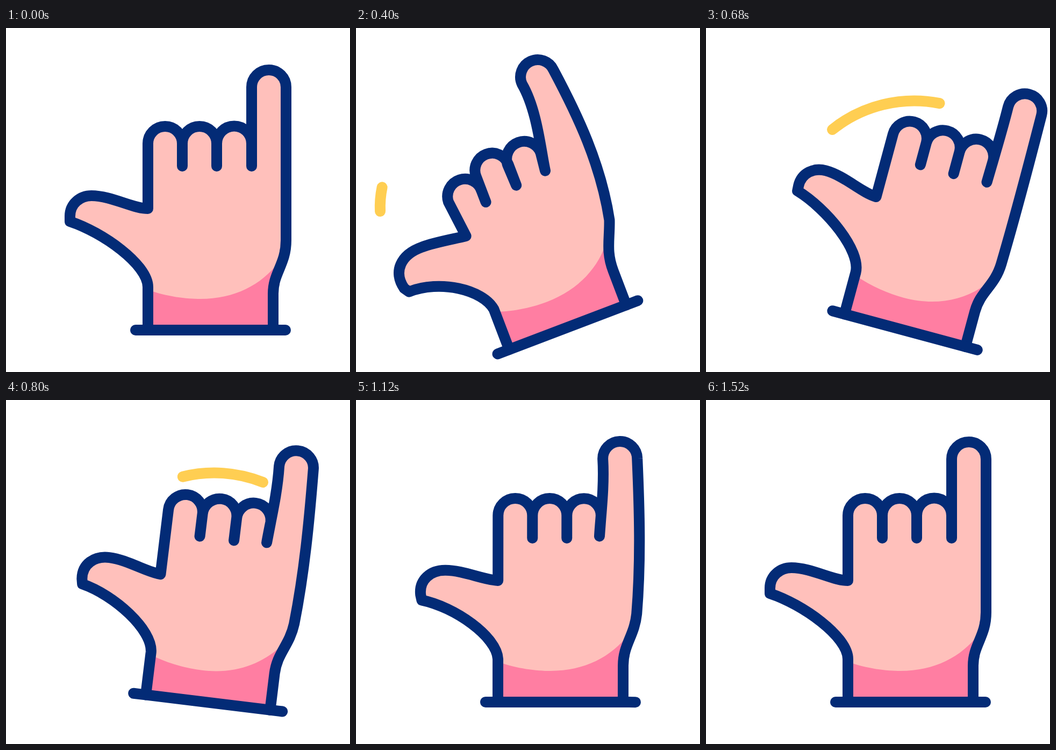
Write an HTML page that moves like this. It is 640 px wide and 640 px high and loops after 2000 ms.

```html
<!DOCTYPE html>
<html lang="en">
<head>
<meta charset="utf-8">
<title>Waving hand</title>
<style>
  html, body { margin: 0; width: 100%; height: 100%; overflow: hidden; background: #fff; }
  svg { display: block; width: 100%; height: 100%; }
  .line { fill: none; stroke: #032b76; stroke-width: 20; stroke-linecap: round; stroke-linejoin: round; }
  .streak { fill: none; stroke: #ffce52; stroke-width: 20; stroke-linecap: round; }
</style>
</head>
<body>
<svg viewBox="0 0 640 640">
  <path class="streak" id="left" pathLength="1" d="M352 87C225 78 38 190 45 341"/>
  <path class="streak" id="right" pathLength="1" d="M235 189A244 244 0 0 1 478 153"/>
  <g id="hand">
    <path id="skin" fill="#ffc0bb"/>
    <path fill="#ff7ea2" d="M264 487C300 500 335 504 362 504C425 504 475 478 507 436C499 460 497 475 497 494V562H264Z"/>
    <path class="line" id="outline"/>
    <path class="line" d="M241 562H520"/>
  </g>
</svg>
<script>
const LOOP = 2000;
const PIVOT = '373 523';
const el = id => document.getElementById(id);

// [time, value] steps, eased in between
const TURN = [[6, 0], [367, -22.2], [663, 15.1], [688, 15.1], [968, -7.7], [1222, 4.2], [1515, 0]];
const BEND = [[6, 0], [367, 1.04], [663, .1], [688, .1], [968, .75], [1222, .15], [1515, 0]];
const CURL = [[6, 0], [367, 1.04], [663, 0]];

const STREAKS = [
  { node: el('left'), head: [[6, 0], [367, 1]], tail: [[125, 0], [469, 1]] },
  { node: el('right'), head: [[476, 0], [756, 1]], tail: [[678, 0], [958, 1]] }
];

const smooth = x => x * x * (3 - 2 * x);

function valueAt(steps, t) {
  if (t <= steps[0][0]) return steps[0][1];
  for (let i = 1; i < steps.length; i++) {
    const [t0, a] = steps[i - 1], [t1, b] = steps[i];
    if (t < t1) return a + (b - a) * smooth((t - t0) / (t1 - t0));
  }
  return steps[steps.length - 1][1];
}

function handPath(bend, curl) {
  // point at rest, shifted by the bend of thumb and little finger and by the finger curl
  const p = (x, y, bx = 0, by = 0, cx = 0, cy = 0) =>
    ` ${(x + bx * bend + cx * curl).toFixed(2)} ${(y + by * bend + cy * curl).toFixed(2)}`;
  // an undersized radius grows to a half circle
  const cap = end => 'A1 1 0 0 1' + end;

  const thumb = 'M264 562L264 482' +
    'C' + p(264, 440, -6, 0) + p(180, 380, 9, 14) + p(119, 360, 9, 35) +
    'L' + p(119, 350, 3, 36) +
    'C' + p(119, 327, -6, 23) + p(138, 312, 0, 13) + p(159, 312, 21, 14) +
    'C' + p(196, 312, 9, 14) + p(236, 336, 4, -3) + p(264, 336);

  const gap1 = p(328, 257, 0, 0, -7, 33);
  const gap2 = p(392, 257, 0, 0, -7, 24);
  const gap3 = p(457, 257, -12, -10, 0, 28);
  const fingers =
    'L' + p(264, 215, 0, 0, -8, 50) + cap(p(328, 215, 0, 0, -7, 53)) + 'L' + gap1 +
    'L' + p(328, 215, 0, 0, -7, 24) + cap(p(392, 215, 0, 0, -7, 24)) + 'L' + gap2 +
    'L' + p(392, 215, 0, 0, -8.5, 25) + cap(p(457, 215, -4, 0, -4, 26)) + 'L' + gap3;

  const little =
    'C' + p(457, 215, -6, 0, 0, 20) + p(457, 160, 14, 4) + p(457, 110, 5, -1) +
    cap(p(521, 110, 5, -5)) +
    'C' + p(521, 205, 17, -5) + p(521, 300, 25, 0) + p(521, 395, 3, 8) +
    'C' + p(521, 440, -9, -3) + ' 497 455 497 494L497 562';

  return thumb + fingers + little;
}

function draw(t) {
  const d = handPath(valueAt(BEND, t), valueAt(CURL, t));
  el('skin').setAttribute('d', d);
  el('outline').setAttribute('d', d);
  el('hand').setAttribute('transform', `rotate(${valueAt(TURN, t)} ${PIVOT})`);

  for (const { node, head, tail } of STREAKS) {
    const from = valueAt(tail, t), size = valueAt(head, t) - from;
    node.style.visibility = size > .001 ? 'visible' : 'hidden';
    node.style.strokeDasharray = `${Math.max(size, 0)} 3`;
    node.style.strokeDashoffset = -from;
  }
}

function tick() {
  draw(performance.now() % LOOP);
  requestAnimationFrame(tick);
}
tick();
</script>
</body>
</html>
```
